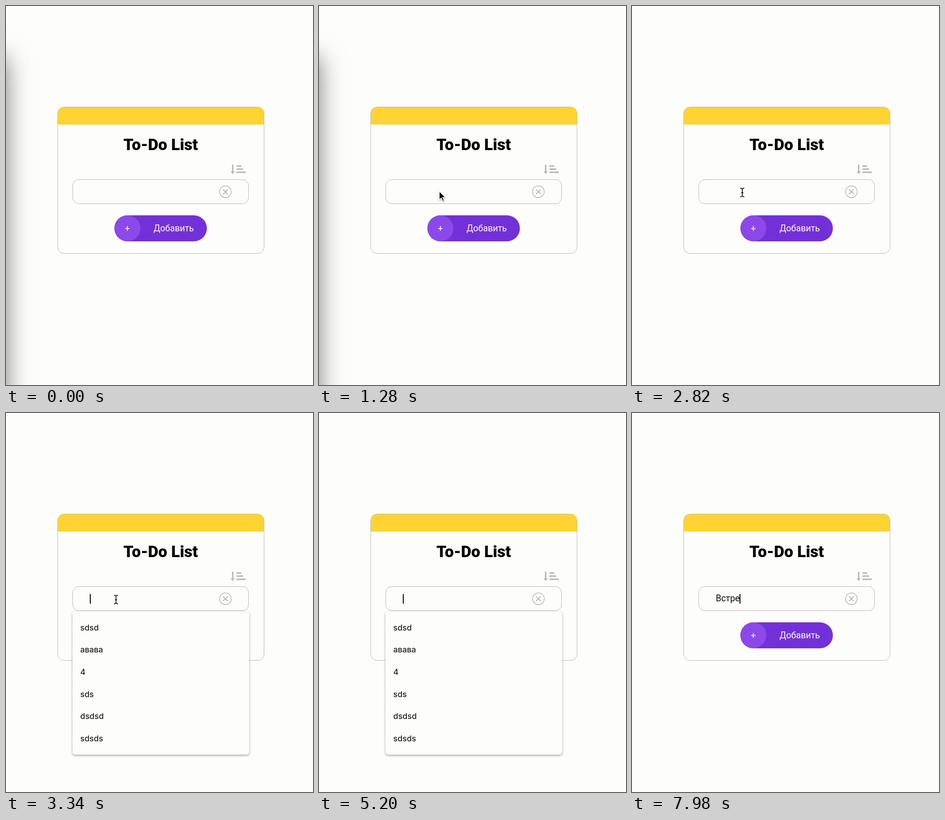
Write an HTML page that moves like this. It is 674 px wide and 831 px high and loops after 8000 ms.

```html
<!DOCTYPE html>
<html lang="ru">
<head>
<meta charset="utf-8">
<title>To-Do List</title>
<style>
  html, body { margin: 0; width: 100%; height: 100%; overflow: hidden; background: #fdfdfb; }
  * { box-sizing: border-box; }
  .stage { position: relative; width: 674px; height: 831px; overflow: hidden; background: #fdfdfb; font: 19.3px/1 Roboto, sans-serif; }
  .stage > *, .button > * { position: absolute; }
  .window-shadow { left: -300px; top: 113px; width: 300px; height: 900px; box-shadow: 0 0 50px rgba(0, 0, 0, .5); }
  .card { left: 112.5px; top: 220.5px; width: 454.5px; height: 322px; border: 1.3px solid #b7b6b3; border-radius: 14px; overflow: hidden; }
  .card::before { content: ""; display: block; height: 38.5px; background: #ffd432; }
  h1 { left: 112px; top: 284px; width: 455px; margin: 0; text-align: center; font-size: 35px; line-height: 41px; font-weight: 900; color: #000; }
  .input { left: 146px; top: 380px; width: 387px; height: 54px; padding-left: 37px; border: 1.3px solid #b5b4b9; border-radius: 14px; display: flex; align-items: center; color: #111; }
  .caret { width: 1.5px; height: 21px; background: #000; }
  .button { left: 238px; top: 459px; width: 203px; height: 57px; border-radius: 29px; background: #7430d8; color: #fff; line-height: 57px; }
  .plus { left: 0; top: 0; width: 57px; height: 57px; border-radius: 50%; background: #8c48e9; text-align: center; }
  .label { left: 86px; top: 0; }
  .list { left: 146px; top: 435px; width: 387.5px; padding: 11.5px 0 10.5px 17px; border-radius: 6px; background: #fdfdfb; box-shadow: 0 2px 5px rgba(0, 0, 0, .36); font: 500 17.6px/48.7px Inter, sans-serif; color: #202024; }
  svg { left: 0; top: 0; }
</style>
</head>
<body>
<div class="stage">
  <div class="window-shadow" id="shadow"></div>
  <div class="card"></div>
  <h1>To-Do List</h1>
  <div class="input"><span id="typed"></span><span class="caret" id="caret"></span></div>
  <div class="button"><span class="plus">+</span><span class="label">Добавить</span></div>
  <svg width="674" height="831" fill="none">
    <path fill="#b9b9b9" d="M496 348h3.2v14.5h3.3L497.6 368.5 493 362.5h3zM506 349.2h10.5v3.2H506zM506 356h14.5v3.2H506zM506 363h20.5v3.3H506z"/>
    <g stroke="#b6b6b9">
      <circle cx="481.7" cy="407.3" r="12.8" stroke-width="1.6"/>
      <path stroke-width="2" d="M476.5 402.1l10.4 10.4m0-10.4l-10.4 10.4"/>
    </g>
  </svg>
  <div class="list" id="list"></div>
  <svg width="674" height="831" fill="none">
    <path id="arrow" fill="#000" stroke="#fff" stroke-width="1.6" style="filter: drop-shadow(0 1px 1.5px rgba(0,0,0,.35))" d="M0 0V19.2L4.4 15.1 7.6 22.6 11 21.1 7.8 13.8H13.6Z"/>
    <path id="beam" stroke="#000" stroke-width="1.6" d="M-4.5-9.5Q0-9.5 0-6.5Q0-9.5 4.5-9.5M0-7V7M-4.5 9.5Q0 9.5 0 6.5Q0 9.5 4.5 9.5M-2.5.5H2.5"/>
  </svg>
</div>
<script>
  const LOOP = 8000, FOCUS = 2900, HIDE_BEAM = 3650, BLINK = 500;
  const word = "Встре";
  const keyTimes = [5700, 6400, 7050, 7600, 7850];
  const history = ["sdsd", "авава", "4", "sds", "dsdsd", "sdsds"];
  const el = id => document.getElementById(id);
  const [shadow, typed, caret, list, arrow, beam] =
    ["shadow", "typed", "caret", "list", "arrow", "beam"].map(el);

  const progress = (t, from, to) => Math.min(1, Math.max(0, (t - from) / (to - from)));
  const smooth = p => p * p * (3 - 2 * p);
  const mix = (a, b, p) => a + (b - a) * p;
  const show = (node, visible) => node.style.visibility = visible ? "visible" : "hidden";
  const place = (node, x, y) => node.setAttribute("transform", `translate(${x} ${y})`);

  let shownItems = "";
  function setItems(items) {
    const key = items.join("\n");
    if (key !== shownItems) {
      list.replaceChildren(...items.map(text => {
        const row = document.createElement("div");
        row.textContent = text;
        return row;
      }));
      shownItems = key;
    }
    show(list, items.length > 0);
  }

  function draw(t) {
    shadow.style.opacity = 1 - smooth(progress(t, 1480, 1800));

    const enter = smooth(progress(t, 350, 1000));
    const leave = smooth(progress(t, 2550, 2850));
    const x = mix(mix(-16, 264, enter), 241.5, leave);
    const y = mix(mix(164, 406, enter), 409, leave);
    place(arrow, x, y);
    place(beam, x, y);
    show(arrow, t < 2700);
    show(beam, t >= 2700 && t < HIDE_BEAM);

    const count = keyTimes.filter(time => t >= time).length;
    typed.textContent = word.slice(0, count);
    const lastInput = count ? keyTimes[count - 1] : FOCUS;
    show(caret, t >= FOCUS && (t - lastInput) % (2 * BLINK) < BLINK);

    setItems(t < FOCUS || count > 1 ? [] : count ? ["ваа"] : history);
  }

  const start = performance.now();
  function tick() {
    draw((performance.now() - start) % LOOP);
    requestAnimationFrame(tick);
  }
  draw(0);
  requestAnimationFrame(tick);
</script>
</body>
</html>
```
